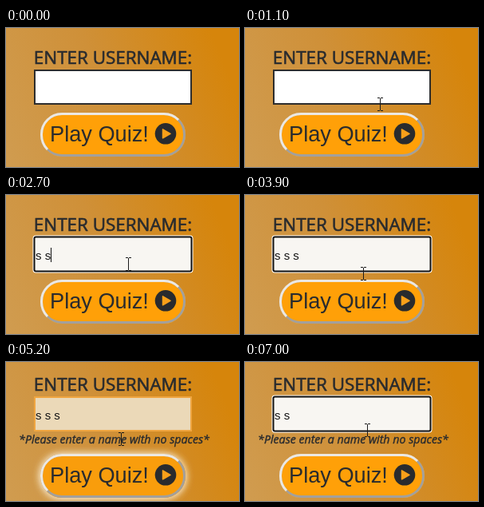
Write an HTML page with a canvas that moves like this. It is 292 px wide and 174 px high and loops after 7.2 s.

```html
<!DOCTYPE html>
<html lang="en">
<head>
<meta charset="utf-8">
<title>Enter username</title>
<style>
  html, body { margin: 0; width: 100%; height: 100%; overflow: hidden; background: #cb8a34; }
  canvas { display: block; width: 292px; height: 174px; }
</style>
</head>
<body>
<canvas id="stage" width="292" height="174"></canvas>
<script>
const W = 292, H = 174, LOOP = 7200, STEP = 100;
const ctx = document.getElementById('stage').getContext('2d');
const INK = '#292b2e';
const SANS = '"Liberation Sans", Arial, sans-serif';
const OPEN = '"Open Sans", sans-serif';

// Each entry: [time, value], held until the next one.
const TYPED = [[0, ''], [1700, 's'], [2100, 's '], [2600, 's s'], [3000, 's s '],
               [3200, 's s s'], [6300, 's s '], [6500, 's s']];
const FOCUS = [[0, false], [1400, true], [4500, false], [6200, true]];

// Each entry: [time, x, y], eased between entries.
const POINTER = [[100, 250, 190], [400, 238, 122], [700, 177, 100], [900, 177, 100],
                 [1400, 153, 86], [3700, 153, 86], [4300, 134, 132], [5100, 134, 132],
                 [5300, 153, 60], [5700, 153, 60], [6200, 153, 85], [7200, 153, 85]];

const clamp = v => Math.min(1, Math.max(0, v));
const ramp = (t, from, to) => clamp((t - from) / (to - from));
const ease = p => p * p * (3 - 2 * p);
const latest = (track, t) => track.filter(entry => entry[0] <= t).pop();

function mix(a, b, p) {
  return `rgb(${a.map((v, i) => Math.round(v + (b[i] - v) * p)).join(',')})`;
}

function pointerAt(t) {
  const i = POINTER.findIndex(key => key[0] > t);
  if (i < 1) return null;
  const [t0, x0, y0] = POINTER[i - 1], [t1, x1, y1] = POINTER[i];
  const p = ease(ramp(t, t0, t1));
  return { x: x0 + (x1 - x0) * p, y: y0 + (y1 - y0) * p };
}

function box(x, y, w, h, r) {
  ctx.beginPath();
  ctx.roundRect(x, y, w, h, r);
}

function text(str, x, y, font, color, align = 'left', weight = 0) {
  ctx.font = font;
  ctx.textAlign = align;
  ctx.fillStyle = ctx.strokeStyle = color;
  ctx.fillText(str, x, y);
  if (weight) {
    ctx.lineWidth = weight;
    ctx.strokeText(str, x, y);
  }
}

function drawBackground() {
  const g = ctx.createLinearGradient(0, 174, 280, 60);
  g.addColorStop(0, '#d09c50');
  g.addColorStop(0.5, '#cf9038');
  g.addColorStop(1, '#d6850b');
  ctx.fillStyle = g;
  ctx.fillRect(0, 0, W, H);
}

function drawInput(y, t, error) {
  const focused = latest(FOCUS, t)[1];
  const value = latest(TYPED, t)[1];
  const errorFill = mix([235, 217, 184], [248, 246, 242], ramp(t, 6000, 6300));
  if (focused) {
    ctx.fillStyle = '#fff';
    box(33.5, y - 1.5, 201, 47, 4);
    ctx.fill();
    ctx.fillStyle = '#101010';
    box(34.5, y - 0.5, 199, 45, 3);
    ctx.fill();
    ctx.fillStyle = error ? errorFill : '#f8f6f2';
    box(36.5, y + 1.5, 195, 41, 1);
    ctx.fill();
  } else {
    ctx.fillStyle = error ? '#efa540' : '#2d2d2d';
    ctx.fillRect(35, y, 198, 44);
    ctx.fillStyle = error ? errorFill : '#fff';
    ctx.fillRect(37, y + 2, 194, 40);
  }
  text(value, 37, y + 28.5, `15px ${SANS}`, '#151515');
  if (!focused) return;
  const lastEdit = Math.max(latest(FOCUS, t)[0], latest(TYPED, t)[0]);
  if ((t - lastEdit) % 1000 < 500) {
    ctx.fillStyle = '#111';
    ctx.fillRect(Math.floor(37 + ctx.measureText(value).width), y + 14, 1, 18);
  }
}

function drawButton(y, glow) {
  const x = 43, w = 182, h = 55, r = 27;
  ctx.save();
  ctx.shadowColor = `rgba(255,246,225,${glow})`;
  ctx.shadowBlur = 19 * glow;
  ctx.shadowOffsetY = glow;
  ctx.fillStyle = mix([255, 160, 8], [243, 154, 16], glow);
  box(x, y, w, h, r);
  for (let pass = 0; pass < 3; pass++) ctx.fill();
  ctx.restore();

  ctx.lineWidth = 3;
  box(x + 1.5, y + 1.5, w - 3, h - 3, r - 1.5);
  ctx.strokeStyle = '#a3a09c';
  ctx.stroke();
  ctx.save();
  ctx.beginPath();
  ctx.moveTo(x, y);
  ctx.lineTo(x + w, y);
  ctx.lineTo(x + w - h / 2, y + h / 2);
  ctx.lineTo(x + h / 2, y + h / 2);
  ctx.lineTo(x, y + h);
  ctx.clip();
  box(x + 1.5, y + 1.5, w - 3, h - 3, r - 1.5);
  ctx.strokeStyle = '#ece8e2';
  ctx.stroke();
  ctx.restore();

  text('Play Quiz!', 55, y + 36, `27.2px ${SANS}`, INK);
  ctx.beginPath();
  ctx.arc(200, y + 26.3, 13.3, 0, Math.PI * 2);
  ctx.fill();
  ctx.fillStyle = ctx.strokeStyle = '#f9a01a';
  ctx.lineWidth = 1.5;
  ctx.lineJoin = 'round';
  ctx.beginPath();
  ctx.moveTo(196.5, y + 20.8);
  ctx.lineTo(206, y + 26.3);
  ctx.lineTo(196.5, y + 31.8);
  ctx.closePath();
  ctx.fill();
  ctx.stroke();
}

function drawSuggestion() {
  ctx.save();
  ctx.shadowColor = 'rgba(0,0,0,.3)';
  ctx.shadowBlur = 5;
  ctx.fillStyle = '#fff';
  box(106, 107, 151, 90, 4);
  ctx.moveTo(123, 108);
  ctx.lineTo(132.5, 98);
  ctx.lineTo(142, 108);
  ctx.fill();
  ctx.restore();
  text('sug', 121, 141, `16px ${OPEN}`, '#222');
}

function drawBeam(x, y) {
  x = Math.round(x);
  y = Math.round(y);
  ctx.fillStyle = '#1a1a1a';
  ctx.fillRect(x, y - 7, 1, 15);
  for (const row of [y - 8, y + 8]) {
    ctx.fillRect(x - 3, row, 3, 1);
    ctx.fillRect(x + 1, row, 3, 1);
  }
}

function drawHand(x, y) {
  ctx.save();
  ctx.translate(x, y);
  ctx.beginPath();
  ctx.moveTo(-2, 1.5);
  ctx.quadraticCurveTo(0, -1.5, 2, 1.5);
  ctx.lineTo(2, 9);
  ctx.quadraticCurveTo(5, 7.5, 6, 10);
  ctx.quadraticCurveTo(9, 8.5, 10, 11.5);
  ctx.quadraticCurveTo(13, 10.5, 13, 14);
  ctx.lineTo(13, 20);
  ctx.lineTo(11, 25);
  ctx.lineTo(11, 28);
  ctx.lineTo(-2, 28);
  ctx.lineTo(-2, 25);
  ctx.lineTo(-7, 16);
  ctx.quadraticCurveTo(-7, 12, -4, 14);
  ctx.lineTo(-2, 16.5);
  ctx.closePath();
  ctx.fillStyle = '#fff';
  ctx.strokeStyle = '#111';
  ctx.lineWidth = 1.4;
  ctx.lineJoin = 'round';
  ctx.fill();
  ctx.stroke();
  ctx.lineWidth = 1;
  ctx.beginPath();
  for (const [fx, top] of [[2, 9], [6, 10], [10, 12]]) {
    ctx.moveTo(fx, top);
    ctx.lineTo(fx, top + 4);
  }
  ctx.stroke();
  ctx.restore();
}

function draw(t) {
  const error = t >= 4800;
  const shift = error ? 9 : 0;
  const buttonY = 106 + shift;
  const glow = ramp(t, 3900, 4200) * (1 - ramp(t, 5100, 5300));

  drawBackground();
  text('ENTER USERNAME:', 134, 45 - shift, `22.4px ${OPEN}`, INK, 'center', 0.6);
  drawButton(buttonY, glow);
  drawInput(52 - shift, t, error);
  if (error) {
    text('*Please enter a name with no spaces*', 135.5, 102, `italic 14.25px ${OPEN}`, INK, 'center', 0.4);
  }
  if (t >= 1700 && t < 2000) drawSuggestion();

  const pointer = pointerAt(t);
  if (!pointer) return;
  const overButton = pointer.x > 43 && pointer.x < 225 && pointer.y > buttonY;
  (overButton ? drawHand : drawBeam)(pointer.x, pointer.y);
}

const start = performance.now();
function frame() {
  const t = (performance.now() - start) % LOOP;
  draw(Math.floor(t / STEP) * STEP);
  requestAnimationFrame(frame);
}
frame();
</script>
</body>
</html>
```
